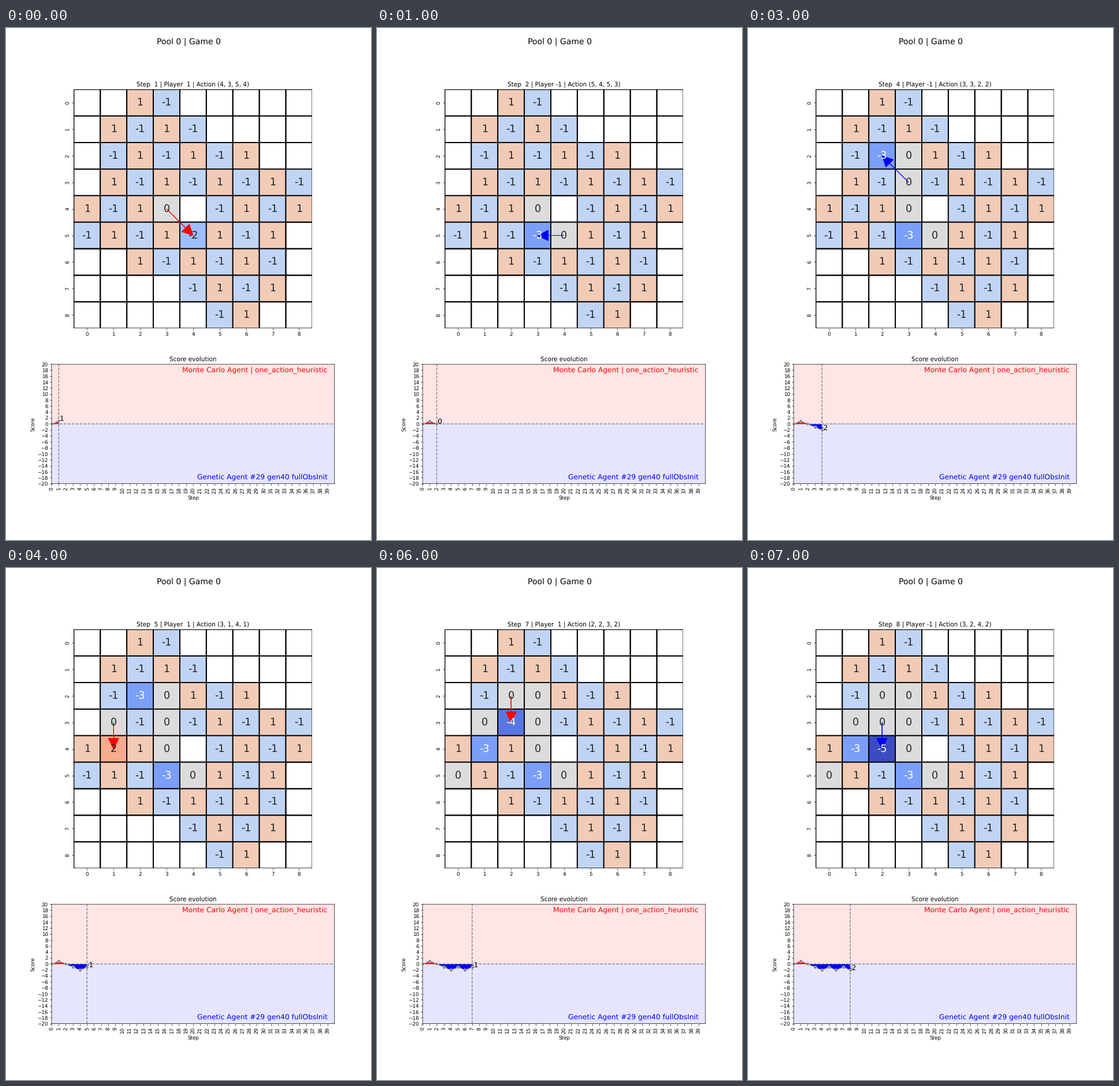
Animation, 632 px wide and 885 px high, one loop 8000 ms. Source, as a matplotlib script:

```python
import matplotlib.pyplot as plt
import numpy as np
from matplotlib.animation import FuncAnimation

W, H, DPI = 632, 885, 63.2
STEPS, SIZE = 40, 9

# First and last occupied column of each board row
ROW_SPANS = [(2, 3), (1, 4), (1, 6), (1, 8), (0, 8), (0, 7), (2, 7), (4, 7), (5, 6)]

# Each move: from row, from column, to row, to column
MOVES = [
    (4, 3, 5, 4), (5, 4, 5, 3), (2, 3, 3, 3), (3, 3, 2, 2),
    (3, 1, 4, 1), (5, 0, 4, 1), (2, 2, 3, 2), (3, 2, 4, 2),
]

# Smooth subpixel lines and unhinted glyphs
plt.rcParams.update({
    "font.family": "DejaVu Sans",
    "text.hinting": "none",
    "path.snap": False,
})


def start_board():
    board = np.ma.masked_all((SIZE, SIZE), dtype=int)
    for r, (first, last) in enumerate(ROW_SPANS):
        for c in range(first, last + 1):
            if (r, c) != (4, 4):
                board[r, c] = 1 if (r + c) % 2 == 0 else -1
    return board


def apply_move(board, move):
    """Stack one tower on another; the moved tower's sign stays on top."""
    r0, c0, r1, c1 = move
    result = board.copy()
    height = abs(board[r0, c0]) + abs(board[r1, c1])
    result[r1, c1] = np.sign(board[r0, c0]) * height
    result[r0, c0] = 0
    return result


boards = [start_board()]
for m in MOVES:
    boards.append(apply_move(boards[-1], m))
scores = np.array([int(np.sign(b).sum()) for b in boards])

# The tiny margin keeps the pixel height from being truncated
fig, (board_ax, score_ax) = plt.subplots(
    2, 1, figsize=(W / DPI, (H + 0.001) / DPI), dpi=DPI,
    gridspec_kw=dict(height_ratios=[2, 1], left=0.125, right=0.9,
                     top=0.88, bottom=0.11, hspace=0.2))
fig.suptitle("Pool 0 | Game 0", fontsize=16)


def draw_board(step):
    ax = board_ax
    ax.clear()
    board, move = boards[step], MOVES[step - 1]
    player = 1 if step % 2 else -1

    ax.pcolormesh(board, cmap="coolwarm", vmin=-5, vmax=5,
                  edgecolors="black", linewidth=2.16, antialiased=True)
    for r, c in np.argwhere(~np.ma.getmaskarray(board)):
        value = board[r, c]
        ax.text(c + 0.5, r + 0.5, f"{value}", fontsize=20,
                color="white" if abs(value) > 2 else "0.15",
                ha="center", va="center")

    r0, c0, r1, c1 = move
    ax.arrow(c0 + 0.5, r0 + 0.5, c1 - c0, r1 - r0, head_width=0.4,
             head_length=0.4, length_includes_head=True,
             color="red" if player == 1 else "blue")

    ax.set(xlim=(0, SIZE), ylim=(SIZE, 0), aspect="equal")
    ticks = np.arange(SIZE)
    ax.set_xticks(ticks + 0.5, ticks)
    ax.set_yticks(ticks + 0.5, ticks, rotation=90, va="center")
    ax.spines[:].set_visible(False)
    ax.set_title(f"Step {step:2d} | Player {player:2d} | Action {move}")


def draw_scores(step):
    ax = score_ax
    ax.clear()
    x, y = np.arange(step + 1), scores[:step + 1]

    ax.axhspan(0, 20, color="red", alpha=0.1, lw=0)
    ax.axhspan(-20, 0, color="blue", alpha=0.1, lw=0)
    ax.fill_between(x, 0, np.maximum(y, 0), color="red", lw=0)
    ax.fill_between(x, 0, np.minimum(y, 0), color="blue", lw=0)
    ax.plot(x, y, "o--", color="gray", ms=6, mec="white", mew=0.75)
    ax.axhline(0, color="gray", ls="--")
    ax.axvline(step, color="gray", ls="--")
    ax.text(step + 0.4, y[-1], f"{y[-1]}", fontsize=14, ha="center")

    ax.text(39, 19, "Monte Carlo Agent | one_action_heuristic",
            color="red", fontsize=14, ha="right", va="top")
    ax.text(39, -19, "Genetic Agent #29 gen40 fullObsInit",
            color="blue", fontsize=14, ha="right", va="bottom")

    ax.set(xlim=(0, STEPS), ylim=(-20, 20), xlabel="Step", ylabel="Score",
           title="Score evolution")
    ax.set_xticks(range(STEPS))
    ax.tick_params(axis="x", rotation=90)
    ax.set_yticks(range(-20, 21, 2))


def draw(frame):
    draw_board(frame + 1)
    draw_scores(frame + 1)
    return []


anim = FuncAnimation(fig, draw, frames=len(MOVES), interval=1000,
                     init_func=lambda: draw(0), repeat=True, repeat_delay=0)
plt.show()
```
